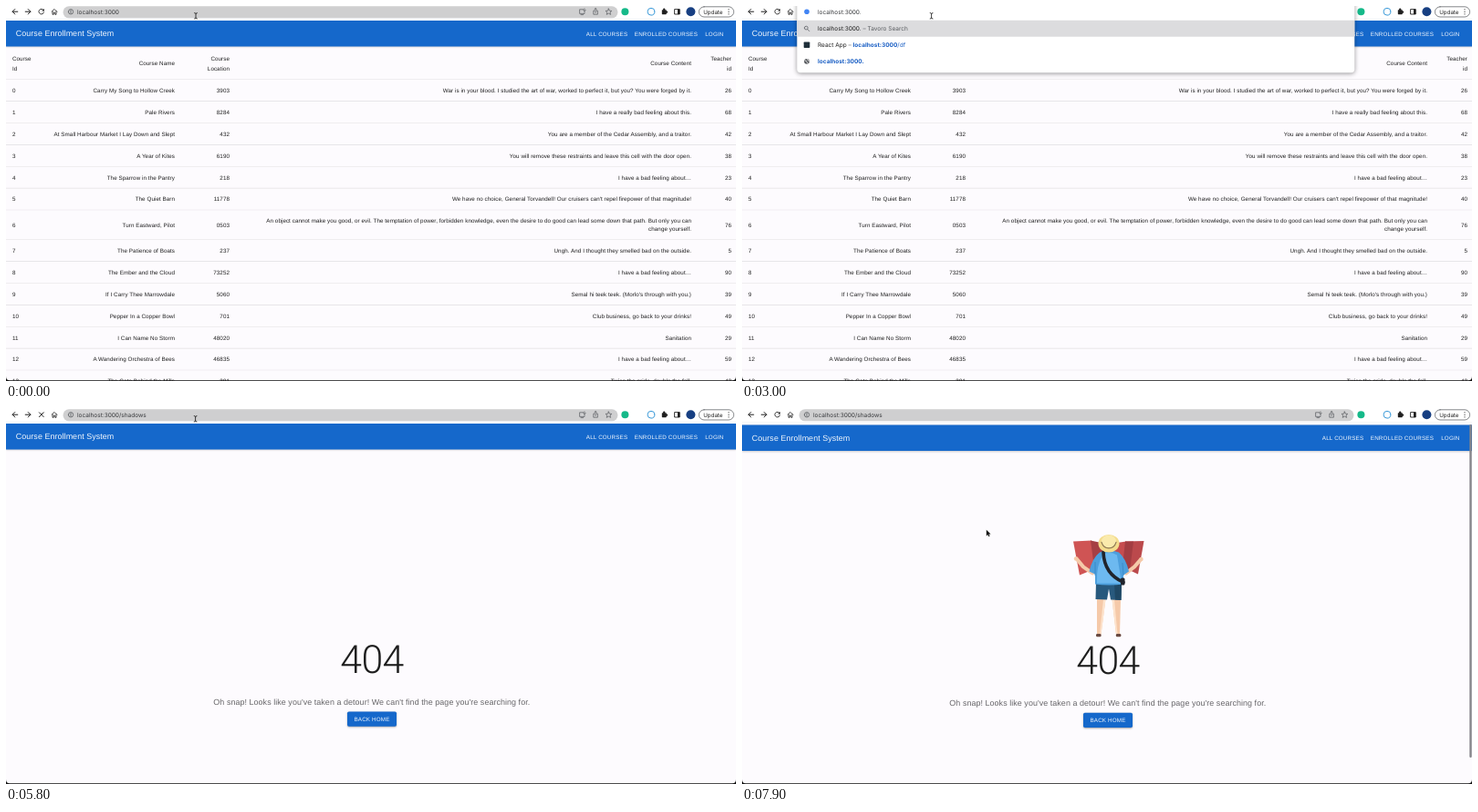
Animation of 800x412 px, one loop 8 s. Source, as an HTML page with a canvas:

```html
<!DOCTYPE html>
<html lang="en">
<head>
<meta charset="utf-8">
<title>Course Enrollment System</title>
<style>
html, body { margin: 0; width: 100%; height: 100%; overflow: hidden; background: #fff; }
canvas { display: block; width: 800px; height: 412px; }
</style>
</head>
<body>
<canvas id="stage"></canvas>
<script>
const canvas = document.getElementById('stage');
const ctx = canvas.getContext('2d');
const ratio = Math.max(1, window.devicePixelRatio || 1);
canvas.width = 800 * ratio;
canvas.height = 412 * ratio;

const LOOP = 8000, STEP = 100;
const PAGE_TOP = 16;
const REM = 16 * 800 / 1792;
const BODY = REM * 0.875;
const PAGE = '"Liberation Sans", Arial, sans-serif';
const CHROME = 'Inter, "Liberation Sans", sans-serif';
const C = { page: '#fdfbfe', bar: '#1568cb', ink: '#1e1e1e', line: '#e1dfe2', pill: '#cfcfd0', row: '#dcdcde',
  grey: '#585b5f', link: '#1a5fc4', select: '#1c4375', icon: '#1f1f1f', skin: '#f5c9a9' };
const HOST = 'localhost:3000';
const TAIL = 'shadows';

const courses = [
  ['Carry My Song to Hollow Creek', 3903, 'War is in your blood. I studied the art of war, worked to perfect it, but you? You were forged by it.', 26],
  ['Pale Rivers', 8284, 'I have a really bad feeling about this.', 68],
  ['At Small Harbour Market I Lay Down and Slept', 432, 'You are a member of the Cedar Assembly, and a traitor.', 42],
  ['A Year of Kites', 6190, 'You will remove these restraints and leave this cell with the door open.', 38],
  ['The Sparrow in the Pantry', 218, 'I have a bad feeling about…', 23],
  ['The Quiet Barn', 11778, "We have no choice, General Torvandell! Our cruisers can't repel firepower of that magnitude!", 40],
  ['Turn Eastward, Pilot', '0503', 'An object cannot make you good, or evil. The temptation of power, forbidden knowledge, even the desire to do good can lead some down that path. But only you can|change yourself.', 76],
  ['The Patience of Boats', 237, 'Ungh. And I thought they smelled bad on the outside.', 5],
  ['The Ember and the Cloud', 73252, 'I have a bad feeling about…', 90],
  ['If I Carry Thee Marrowdale', 5060, "Semal hi teek teek. (Morlo's through with you.)", 39],
  ['Pepper In a Copper Bowl', 701, 'Club business, go back to your drinks!', 49],
  ['I Can Name No Storm', 48020, 'Sanitation', 29],
  ['A Wandering Orchestra of Bees', 46835, 'I have a bad feeling about…', 59],
  ['The Gate Behind the Mills', 391, 'Twice the pride, double the fall.', 43]
];

function text(s, x, y, { size = BODY, font = PAGE, color = C.ink, align = 'left', weight = 400, gap = 0.0107 } = {}) {
  ctx.font = `${weight} ${size}px ${font}`;
  ctx.letterSpacing = gap * size + 'px';
  ctx.textAlign = align;
  ctx.fillStyle = color;
  ctx.fillText(s, x, y);
  return ctx.measureText(s).width;
}
const ui = (s, x, y, opts = {}) => text(s, x, y, { size: 6.5, font: CHROME, gap: 0, ...opts });

function rect(x, y, w, h, color, r = 0) {
  ctx.fillStyle = color;
  ctx.beginPath();
  ctx.roundRect(x, y, w, h, r);
  ctx.fill();
}
function dot(x, y, r, color) {
  ctx.fillStyle = color;
  ctx.beginPath();
  ctx.arc(x, y, r, 0, 7);
  ctx.fill();
}
function path(d, color, width = 0) {
  const p = new Path2D(d);
  if (width) {
    ctx.strokeStyle = color;
    ctx.lineWidth = width;
    ctx.stroke(p);
  } else {
    ctx.fillStyle = color;
    ctx.fill(p);
  }
}
function shadow(color, blur, dy, draw) {
  ctx.save();
  ctx.shadowColor = color;
  ctx.shadowBlur = blur * ratio;
  ctx.shadowOffsetY = dy * ratio;
  draw();
  ctx.restore();
}
// Linear value between [time, value] keys
function track(keys, t) {
  if (t <= keys[0][0]) return keys[0][1];
  for (let i = 1; i < keys.length; i++) {
    const [t0, v0] = keys[i - 1], [t1, v1] = keys[i];
    if (t <= t1) return v0 + (v1 - v0) * (t - t0) / (t1 - t0);
  }
  return keys[keys.length - 1][1];
}

function appBar() {
  shadow('rgba(0,0,0,.2)', 2, 0.6, () => rect(0, PAGE_TOP, 800, 28.6, C.bar));
  const white = { color: '#f4f8fd' };
  text('Course Enrollment System', 10.8, 33.2, { ...white, size: REM * 1.25, gap: 0.0075 });
  const items = { 'ALL COURSES': 635.8, 'ENROLLED COURSES': 688.8, LOGIN: 766.2 };
  for (const s in items) text(s, items[s], 32.6, { ...white, gap: 0.0286 });
}

function table() {
  const right = { align: 'right' };
  text('Course', 7, 59.7);
  text('Id', 7, 70.6);
  text('Course Name', 185, 65.2, right);
  text('Course', 245, 59.7, right);
  text('Location', 245, 70.6, right);
  text('Course Content', 751, 65.2, right);
  text('Teacher', 795, 59.7, right);
  text('id', 795, 70.6, right);
  let y = 81;
  rect(0, y - 0.5, 800, 0.6, C.line);
  courses.forEach(([name, place, content, teacher], i) => {
    const lines = content.split('|');
    const h = 23.87 + (lines.length - 1) * 8.9;
    const base = y + h / 2 + 2.1;
    text(i, 7, base);
    text(name, 185, base, right);
    text(place, 245, base, right);
    lines.forEach((s, k) => text(s, 751, base + (k - (lines.length - 1) / 2) * 8.9, right));
    text(teacher, 795, base, right);
    y += h;
    rect(0, y - 0.5, 800, 0.6, C.line);
  });
}

function traveller() {
  ctx.save();
  ctx.translate(0, 12);
  ctx.lineCap = 'round';
  // map
  path('M363 132L383 131 387 162 370 169Z', '#cf5454');
  path('M382 131L401 135 401 163 386 161Z', '#a63f44');
  path('M401 135L421 132 418 162 401 163Z', '#c64c4f');
  path('M420 132L440.5 131.5 434 168 417 160Z', '#bb494c');
  path('M420 132L429 132 425 164 417 160Z', '#a33d42');
  // arms
  path('M366.5 151L374 160 384 167', C.skin, 4);
  path('M437 152L430 160 421 167', C.skin, 4);
  dot(366, 151, 2.2, C.skin);
  dot(437.5, 151.5, 2.2, C.skin);
  // legs and shoes
  path('M389 195L398.5 195 393.5 234 389 234Z', C.skin);
  path('M405.5 195L415 195 414 234 410 234Z', C.skin);
  path('M396 196L398.5 196 393.5 234 392 234Z', '#fde3cd');
  path('M405.5 196L408 196 411.5 234 410 234Z', '#fde3cd');
  rect(388, 233.5, 5.6, 3.4, '#6a4a42', 1.4);
  rect(409.8, 233.5, 5.6, 3.4, '#6a4a42', 1.4);
  // shorts
  path('M388 177L416 177 415.5 196.5 404 196 402 184 400 196 387.5 195.5Z', '#28597d');
  path('M408 178L416 178 415.5 196.5 409 196.2Z', '#1f4865');
  // shirt
  path('M392 144Q402 140 413 144Q421 151 424 165L418 169 418 179Q402 181 387 179L387 168 380.5 165Q384 150 392 144Z', '#4d9fdd');
  path('M396 146Q404 143 411 147L416 178 389 178Q388 158 396 146Z', '#6db9f0');
  path('M387 155L387 169M417 156L418 169', '#3787c5', 0.8);
  // strap and bag
  path('M396 144Q397 168 418 177', '#20242c', 3.6);
  rect(415, 172, 4.5, 8, '#20242c', 1.5);
  // hat
  ctx.beginPath();
  ctx.ellipse(402, 134.3, 11.5, 9.8, 0, 0, 7);
  ctx.fillStyle = '#f3dc8d';
  ctx.fill();
  ctx.beginPath();
  ctx.ellipse(402, 132, 8, 6.8, 0, 0, 7);
  ctx.fillStyle = '#faeaac';
  ctx.fill();
  path('M394 133Q396 139.5 402 139.5Q408 139.5 410 133', '#8b7754', 1.2);
  ctx.restore();
}

function notFound(hasPicture) {
  if (hasPicture) traveller();
  const mid = { align: 'center' };
  text('404', 401, 289.5, { ...mid, size: REM * 6, font: 'Roboto, "Open Sans", sans-serif', weight: 300, gap: -0.0156 });
  text("Oh snap! Looks like you've taken a detour! We can't find the page you're searching for.", 400.8, 324.9,
    { ...mid, size: REM * 1.25, gap: 0.0075, color: '#666568' });
  shadow('rgba(0,0,0,.35)', 2, 0.8, () => rect(374, 332.4, 54, 16.3, C.bar, 1.8));
  text('BACK HOME', 401, 342.8, { ...mid, color: '#f4f8fd', gap: 0.0286 });
}

function info(x, y) {
  path(`M${x - 2.7} ${y}a2.7 2.7 0 1 0 5.4 0a2.7 2.7 0 1 0 -5.4 0M${x} ${y - 0.3}v1.8M${x} ${y - 1.6}v.7`, '#4c4f53', 0.7);
}
function lens(x, y) {
  path(`M${x - 2.6} ${y - 0.7}a1.9 1.9 0 1 0 3.8 0a1.9 1.9 0 1 0 -3.8 0M${x + 0.7} ${y + 0.7}l2.1 2.1`, '#5b5e62', 0.8);
}
function globe(x, y) {
  dot(x, y, 2.9, '#55585c');
  path(`M${x - 2} ${y - 1}q2 .2 2 1.6t1.2 1.6M${x + 0.6} ${y - 2.3}q0 1.6 1.8 1.9`, '#fff', 0.8);
}
const icons = {
  lens, globe, info,
  engine: (x, y) => dot(x, y, 2.8, '#4285f4'),
  app: (x, y) => rect(x - 3.3, y - 3.3, 6.6, 6.6, '#20303a', 0.8),
  food: (x, y) => rect(x - 3.3, y - 2.8, 6.6, 5.6, '#a98a61', 0.8)
};

function toolbar(t) {
  rect(0, 0, 800, PAGE_TOP, '#fff');
  rect(0, 14.4, 800, 0.6, '#ededef');
  ctx.lineCap = 'round';
  ctx.lineJoin = 'round';
  path('M12.8 6.2H7.2M9.8 3.5L7.1 6.2 9.8 8.9M21.2 6.2h5.6M24.2 3.5L26.9 6.2 24.2 8.9', C.icon, 1);
  if (t >= 5600 && t < 6000) path('M36.4 3.8l4.8 4.8M41.2 3.8l-4.8 4.8', C.icon, 1);
  else {
    path('M41 4.4A2.8 2.8 0 1 0 41.5 6.9', C.icon, 0.9);
    path('M41.9 2.9v2.7h-2.7Z', C.icon);
  }
  path('M50.1 6.3L53 3.4 55.9 6.3M51 5.8V9.3h1.2V7.2h1.6V9.3H55V5.8', C.icon, 0.8);

  dot(678.4, 6.2, 4, '#15b989');
  ctx.strokeStyle = '#3b9ad9';
  ctx.lineWidth = 1;
  ctx.beginPath();
  ctx.arc(707, 6.2, 3.9, 0, 7);
  ctx.stroke();
  rect(718.8, 4.2, 5, 5, C.icon, 0.6);
  dot(721.2, 3.8, 1.2, C.icon);
  dot(724, 6.6, 1.2, C.icon);
  path('M733 3.6h5.2v5.4h-5.2Z', C.icon, 0.9);
  rect(736, 3.6, 2.4, 5.4, C.icon);
  dot(750.4, 6.2, 5, '#173f82');
  path('M765 .8H792A5.6 5.6 0 0 1 792 12H765A5.6 5.6 0 0 1 765 .8Z', '#66696d', 0.8);
  ui('Update', 764.2, 8.6, { size: 6.2 });
  for (const y of [3.8, 6.3, 8.8]) dot(792, y, 0.6, C.icon);
}

function caret(x, t) {
  if ((t + LOOP - 100) % 1000 < 500) rect(x + 0.3, 2.4, 0.6, 8, '#111');
}

function addressBar(t) {
  const focused = t >= 100 && t < 5600;
  rect(62.5, 0.3, 608, 13, focused ? '#fff' : C.pill, 6.5);
  if (focused) {
    ctx.strokeStyle = '#2468b8';
    ctx.lineWidth = 1.2;
    ctx.beginPath();
    ctx.roundRect(63, 0.6, 607, 12.5, 6.2);
    ctx.stroke();
  }
  info(71, 6.3);
  const url = t < 5600 ? HOST : `${HOST}/${TAIL}`;
  if (t >= 100 && t < 600) marked(url, 78);
  else {
    const w = ui(url, 78, 8.6, { color: '#37393c' });
    if (focused) caret(78 + w, t);
  }
  path('M633 3.8H628.6V8.4H634V6.6M630 9.6h2.6M634 3v2.6M632.8 4.6L634 5.8 635.2 4.6', '#55585c', 0.7);
  path('M644.8 5.2h-1V9.2h4.6V5.2h-1M646.1 7.4V2.6M644.8 3.8L646.1 2.5 647.4 3.8', '#55585c', 0.7);
  path('M660.4 3l1 2.2 2.4.2-1.8 1.6.6 2.4-2.2-1.3-2.2 1.3.6-2.4-1.8-1.6 2.4-.2Z', '#55585c', 0.7);
}

function marked(s, x) {
  ctx.font = `400 6.5px ${CHROME}`;
  ctx.letterSpacing = '0px';
  rect(x, 2.2, ctx.measureText(s).width + 0.4, 8.6, C.select);
  ui(s, x, 8.6, { color: '#fff' });
}

const plain = s => [s, C.ink, 400], grey = s => [s, C.grey, 400];
const link = s => [s, C.link, 400], bold = s => [s, C.link, 700];
const find = q => ['lens', plain(q), grey(' – Tavoro Search')];
const visit = (title, typed, rest = '', icon = 'app') => [icon, plain(title), grey(' – '), bold(typed), link(rest)];

// Typed text, inline completion and suggestions at time t
function query(t) {
  if (t < 3300) {
    const q = HOST + '.';
    return { q, icon: 'engine', rows: [find(q), visit('React App', HOST, '/df'), ['globe', bold(q)]] };
  }
  if (t < 4000) {
    const q = t < 3600 ? HOST : HOST + '/';
    const rest = s => (HOST + '/' + s).slice(q.length);
    const rows = [visit('React App', q), find(q)];
    for (const s of ['df', 'login', 'courses', 'enrolled']) rows.push(visit('React App', q, rest(s)));
    rows.push(visit('PlateMuse', q, rest('search/pastry'), 'food'));
    return { q, icon: 'info', rows };
  }
  const n = t < 4400 ? 1 : t < 4700 ? 2 : Math.min(TAIL.length, 3 + Math.floor((t - 4700) / 150));
  const q = `${HOST}/${TAIL.slice(0, n)}`, done = TAIL.slice(n);
  const rows = [visit('React App', q, done), find(q)];
  if (n === 1) rows.push(visit('PlateMuse', q, 'earch/pastry', 'food'));
  return { q, done, icon: 'app', rows, close: true };
}

function dropdown(t) {
  const { q, done, icon, rows, close } = query(t);
  shadow('rgba(0,0,0,.42)', 5, 1, () => rect(60.3, -6, 611, 25.2 + rows.length * 18, '#fff', 4));
  icons[icon](71, 6.3);
  const end = 83 + ui(q, 83, 8.6, { color: '#37393c' });
  if (done) marked(done, end);
  else caret(end, t);
  rect(60.3, 15.8, 611, 18, C.row);
  rows.forEach(([kind, ...parts], i) => {
    const y = 24.8 + i * 18;
    icons[kind](71, y);
    let x = 83;
    for (const [s, color, weight] of parts) x += ui(s, x, y + 2.3, { color, weight });
  });
  if (close) path('M660.3 22.8l4 4M664.3 22.8l-4 4', '#333', 0.9);
}

function pointer(t) {
  if (t < 6300) {
    const x = t < 900 ? 208 : 207.6;
    path(`M${x - 1.4} 7.6q1.4 0 1.4 .9v4.6q0 .9 -1.4 .9M${x + 1.4} 7.6q-1.4 0 -1.4 .9M${x + 1.4} 14q-1.4 0 -1.4 -.9`, '#111', 0.8);
    return;
  }
  const x = track([[6200, 208], [6500, 268.7], [7400, 268.7], [7900, 267.8]], t);
  const y = track([[6200, 11], [6500, 115.8], [7400, 115.8], [7900, 132.8]], t);
  const d = `M${x} ${y}v6.6l1.6 -1.4 1 2.3 1.1 -.5 -1 -2.2h2.1Z`;
  path(d, '#fff', 1);
  path(d, '#111');
}

function draw(t) {
  ctx.setTransform(ratio, 0, 0, ratio, 0, 0);
  ctx.textBaseline = 'alphabetic';
  // Unhinted glyphs keep small text at its true proportions
  ctx.textRendering = 'geometricPrecision';
  rect(0, 0, 800, 412, C.page);
  const scroll = track([[6800, 0], [7000, 12], [7200, 29], [7400, 29], [7800, -3], [7900, -1.4]], t);

  ctx.save();
  ctx.beginPath();
  ctx.rect(0, PAGE_TOP, 800, 397);
  ctx.clip();
  ctx.translate(0, -scroll);
  if (t < 5700) table();
  else notFound(t >= 5900);
  appBar();
  ctx.restore();

  if (t >= 6900) rect(797.3, 17 + Math.max(0, scroll) * 0.93, 2.4, 366, '#85858a', 1.2);
  toolbar(t);
  if (t >= 2300 && t < 5600) dropdown(t);
  else addressBar(t);
  pointer(t);
  // window edge
  path('M0 407Q0 411.2 4 411.2H796Q800 411.2 800 407V412H0Z', '#111');
}

function tick(now) {
  draw(Math.floor((now % LOOP) / STEP) * STEP);
  requestAnimationFrame(tick);
}
requestAnimationFrame(tick);
</script>
</body>
</html>
```
